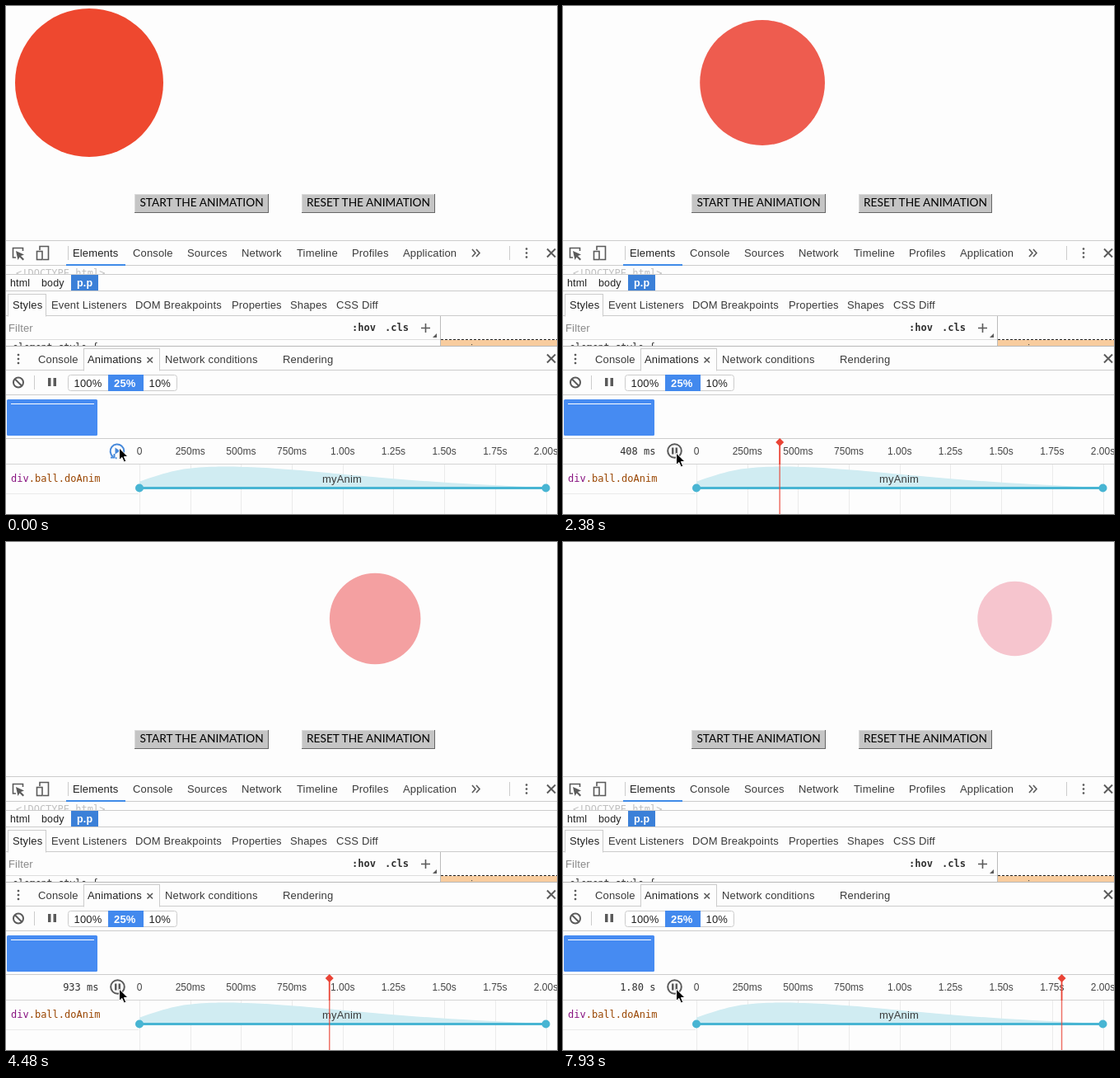
An HTML page for the animation above (8 s loop, 669 by 616 pixels).

```html
<!DOCTYPE html>
<html lang="en">
<head>
<meta charset="utf-8">
<title>Animation inspector</title>
<style>
  html, body { margin: 0; width: 100%; height: 100%; overflow: hidden; background: #fdfdfd; }
  svg { display: block; width: 669px; height: 616px; }
  text { white-space: pre; }
  .ui { font: 13px "Liberation Sans", Arial, sans-serif; letter-spacing: .15px; fill: #3a3a3a; }
  .tick { font: 12px "Liberation Sans", Arial, sans-serif; fill: #444; text-anchor: middle; }
  .mono { font: 12px "DejaVu Sans Mono", monospace; fill: #303030; }
  .btn { font: 13.7px Lato, "Open Sans", sans-serif; fill: #000; text-anchor: middle; }
  .icon { fill: none; stroke: #5a5a5a; stroke-width: 2; }
  .thin { stroke-width: 1.6; }
  .solid { fill: #5a5a5a; }
  .bold { font-weight: bold; }
  .white { fill: #fff; }
  .dark { fill: #222; }
</style>
</head>
<body>
<svg id="stage" viewBox="0 0 669 616" xmlns="http://www.w3.org/2000/svg">
  <defs>
    <clipPath id="domClip"><rect x="0" y="316" width="669" height="10"/></clipPath>
    <clipPath id="styleClip"><rect x="0" y="405" width="669" height="7"/></clipPath>
  </defs>
  <circle id="ball" cx="101" cy="93" r="90"/>
  <g id="panel"></g>

  <!-- main toolbar icons -->
  <path class="icon thin" d="M12 305H8.500V293.500H20.500V297"/>
  <path class="solid" d="M12 297L22 301.500L18 303L22 307L20.500 308.500L16.500 304.500L14.500 308Z"/>
  <path class="icon thin" d="M41 296V291.500H51.500V307.500H45"/>
  <rect class="icon thin" x="37.500" y="297.500" width="6.500" height="10"/>
  <path class="icon thin" d="M566 295l4 4.500l-4 4.500M571 295l4 4.500l-4 4.500"/>
  <path class="icon" d="M657 294.500l10 10m0-10l-10 10M657 422.500l10 10m0-10l-10 10"/>
  <path class="icon thin" d="M171.500 426l6.500 6.500m0-6.500l-6.500 6.500"/>
  <path class="icon thin" d="M504 390.500h11M509.500 385v11"/>
  <path class="solid" d="M523 397v5h-5z"/>

  <!-- playback toolbar icons -->
  <circle class="icon" cx="15" cy="456.500" r="6"/>
  <path class="icon" d="M11 452.500l8 8"/>
  <path class="solid" d="M51 451h3.500v10h-3.500zM57.500 451h3.500v10h-3.500z"/>

  <!-- timeline -->
  <path id="speed" fill="#d0ecf2"/>
  <path d="M162 584.500H655" stroke="#48b5d3" stroke-width="3"/>
  <circle cx="162" cy="584.500" r="5" fill="#48b5d3"/>
  <circle cx="655.500" cy="584.500" r="5" fill="#48b5d3"/>
  <text class="ui" x="408" y="578" text-anchor="middle">myAnim</text>

  <g id="scrub">
    <path d="M0 529V556" stroke="#ea4335" stroke-width="1.800"/>
    <path d="M0 556V616" stroke="#ea4335" stroke-width="1.500" opacity=".75"/>
    <path d="M0 524l5 5l-5 5l-5-5z" fill="#ea4335"/>
  </g>
  <text id="clock" class="mono" x="112.500" y="544" text-anchor="end"></text>

  <g id="replay" fill="none" stroke="#4689db" stroke-width="2">
    <path d="M130 546.500A8.300 8.300 0 1 1 141 545.500"/>
    <path d="M127 547.500h4.500v-4.500"/>
    <path d="M133 548.200h1.500M137 547.800h1.500"/>
    <path d="M132.500 535.500v8l6-4z" fill="#4689db" stroke="none"/>
  </g>
  <g id="pause">
    <circle class="icon" cx="135.500" cy="539.500" r="8.300"/>
    <path class="solid" d="M132 535.500h2.500v8h-2.500zM136.500 535.500h2.500v8h-2.500z"/>
  </g>
  <path id="cursor" d="M0 0V14.500L3.400 11.400L5.800 17L8.300 16L5.900 10.500H10.500Z" fill="#000" stroke="#fff" stroke-width="1"/>
</svg>
<script>
const $ = id => document.getElementById(id);
const LOOP = 8000, X0 = 162, X1 = 655.5;
const parts = [];

const rect = (x, y, w, h, fill, extra = '') =>
  parts.push(`<rect x="${x}" y="${y}" width="${w}" height="${h}" fill="${fill}" ${extra}/>`);
const text = (x, y, str, cls = 'ui', extra = '') =>
  parts.push(`<text x="${x}" y="${y}" class="${cls}" ${extra}>${str}</text>`);
const rule = (y, w = 669, color = '#ccc') => rect(0, y, w, 1, color);
const post = (x, y, h, color = '#ccc') => rect(x, y, 1, h, color);
const row = (y, items) => items.forEach(([x, str]) => text(x, y, str));
const dots = (x, y) => [-5, 0, 5].forEach(d => rect(x - 1.3, y + d - 1.3, 2.6, 2.6, '#5a5a5a', 'rx="1"'));

function button(x, w, label) {
  rect(x, 228, w, 23, '#666');
  rect(x, 228, w - 1, 22, '#dadada');
  rect(x + 1, 229, w - 2, 21, '#c5c5c5');
  text(x + w / 2, 243, label, 'btn');
}

function drawPanel() {
  button(156, 163, 'START THE ANIMATION');
  button(359, 162, 'RESET THE ANIMATION');

  // main tabs
  rect(0, 284, 669, 332, '#fdfdfd');
  rule(284); rule(314);
  post(75, 291, 17); post(611, 291, 17);
  rect(73, 313, 72, 2, '#3f8be8');
  text(81, 304, 'Elements', 'ui dark');
  row(304, [[154, 'Console'], [220, 'Sources'], [286, 'Network'], [353, 'Timeline'],
    [420, 'Profiles'], [482, 'Application']]);
  dots(632, 299.5);
  text(12, 327.5, '&lt;!DOCTYPE html&gt;', 'mono', 'style="fill:#c0c0c0" clip-path="url(#domClip)"');

  // breadcrumbs
  rule(325);
  rect(79, 326, 33, 19, '#3b80d8');
  text(5, 339.5, 'html', 'ui dark', 'style="font-size:12.5px"');
  text(43, 339.5, 'body', 'ui dark', 'style="font-size:12.5px"');
  text(86, 339.5, 'p.p', 'ui bold white', 'style="font-size:12.5px"');

  // style tabs and filter
  rule(345); rule(375);
  rect(2.5, 349.5, 46, 26.5, '#fdfdfd', 'stroke="#ccc"');
  rect(3, 375, 45, 2, '#fdfdfd');
  text(8, 367, 'Styles', 'ui dark');
  row(367, [[55, 'Event Listeners'], [157, 'DOM Breakpoints'], [274, 'Properties'],
    [345, 'Shapes'], [401, 'CSS Diff']]);
  text(3, 395, 'Filter', 'ui', 'style="fill:#8a8a8a"');
  text(420, 394, ':hov', 'mono bold');
  text(460, 394, '.cls', 'mono bold');
  rule(404, 527, '#ddd');
  text(8, 418, 'element.style {', 'mono', 'style="font-size:11.5px" clip-path="url(#styleClip)"');
  rect(528, 405, 141, 7, '#f8cc9e');
  parts.push('<path d="M528 404.500H669" stroke="#222" stroke-dasharray="3 2"/>');
  text(537, 419, 'margin', 'tick', 'style="text-anchor:start" clip-path="url(#styleClip)"');
  post(527, 376, 36, '#bbb');

  // drawer tabs
  rule(412, 669, '#b8b8b8'); rule(441);
  rect(94.5, 415.5, 92, 26.5, '#fdfdfd', 'stroke="#ccc"');
  rect(95, 441, 91, 2, '#fdfdfd');
  dots(15, 428);
  text(99, 433, 'Animations', 'ui dark');
  row(433, [[39, 'Console'], [193, 'Network conditions'], [336, 'Rendering']]);

  // playback rate
  post(34, 448, 17);
  rect(75.5, 447.5, 132, 19, '#fff', 'rx="3" stroke="#ccc"');
  rect(124, 447, 43, 20, '#4289ee');
  text(82.5, 462, '100%', 'ui dark');
  text(131, 462, '25%', 'ui bold white');
  text(173.5, 462, '10%', 'ui dark');
  rule(471);

  // preview and timeline grid
  rect(1, 477, 110, 44, '#468bf2', 'rx="1.500"');
  rect(6, 482, 101, 1, '#fff');
  rule(524); rule(555, 669, '#d4d4d4'); rule(591, 161, '#ebebeb');
  ['0', '250ms', '500ms', '750ms', '1.00s', '1.25s', '1.50s', '1.75s', '2.00s'].forEach((label, i) => {
    const x = X0 + (X1 - X0) * i / 8;
    post(Math.round(x), 556, 60, '#ebebeb');
    text(x, 544, label, 'tick');
  });
  text(6, 577, '<tspan fill="#881280">div</tspan><tspan fill="#994500">.ball.doAnim</tspan>', 'mono');
  $('panel').innerHTML = parts.join('');
}

// CSS "ease": cubic-bezier(.25, .1, .25, 1)
const bez = (a, b, s) => 3 * (1 - s) ** 2 * s * a + 3 * (1 - s) * s * s * b + s ** 3;
const slope = (a, b, s) => 3 * (1 - s) ** 2 * a + 6 * (1 - s) * s * (b - a) + 3 * s * s * (1 - b);

function ease(x) {
  let lo = 0, hi = 1;
  for (let i = 0; i < 30; i++) {
    const mid = (lo + hi) / 2;
    if (bez(.25, .25, mid) < x) lo = mid; else hi = mid;
  }
  return bez(.1, 1, lo);
}

// speed of the easing curve, squashed into 0..1
function drawSpeed() {
  let d = `M${X0} 584`;
  for (let i = 0; i <= 60; i++) {
    const s = i / 60;
    const x = X0 + (X1 - X0) * bez(.25, .25, s);
    const v = Math.tanh(slope(.1, 1, s) / slope(.25, .25, s) / 1.5);
    d += `L${x.toFixed(1)} ${(584 - 28 * v).toFixed(1)}`;
  }
  $('speed').setAttribute('d', d + `L${X1} 584Z`);
}

// progress, r, g, b
const TINTS = [
  [0, 238, 72, 47], [.316, 238, 92, 79], [.55, 240, 125, 120],
  [.77, 244, 160, 161], [.9, 245, 181, 186], [1, 246, 198, 207]
];

function tint(p) {
  const i = Math.max(1, TINTS.findIndex(c => c[0] >= p));
  const a = TINTS[i - 1], b = TINTS[i];
  const k = (p - a[0]) / (b[0] - a[0]);
  return `rgb(${[1, 2, 3].map(n => Math.round(a[n] + (b[n] - a[n]) * k))})`;
}

const show = (id, on) => $(id).style.display = on ? '' : 'none';

function render(now) {
  // the screen refreshes in 150 ms steps once playback runs
  const running = now >= 730, started = now >= 590;
  const t = running ? 730 + 150 * Math.floor((now - 730) / 150) : now;
  const ms = running ? Math.max(0, (t > 1180 ? 108 : 104) + (t - 1180) / 4) : 0;
  const p = ease(Math.min(1, (ms ? ms + 8 : 0) / 2000));

  const ball = $('ball');
  ball.setAttribute('cx', 101 + 450 * p);
  ball.setAttribute('r', 90 - 45 * p);
  ball.setAttribute('fill', tint(p));

  // the scrubber still rests at the end when replay is pressed
  const x = running ? X0 + .5 + (X1 - X0) * ms / 2000 : X1;
  $('scrub').setAttribute('transform', `translate(${x} 0)`);
  $('clock').textContent = !running ? '' : ms < 1000 ? Math.round(ms) + ' ms' : (ms / 1000).toFixed(2) + ' s';
  show('scrub', started);
  show('pause', started);
  show('replay', !started);
  $('cursor').setAttribute('transform', `translate(137.500 ${now < 140 ? 536 : 542})`);
}

drawPanel();
drawSpeed();
const start = performance.now();
function tick() {
  render((performance.now() - start) % LOOP);
  requestAnimationFrame(tick);
}
tick();
</script>
</body>
</html>
```
